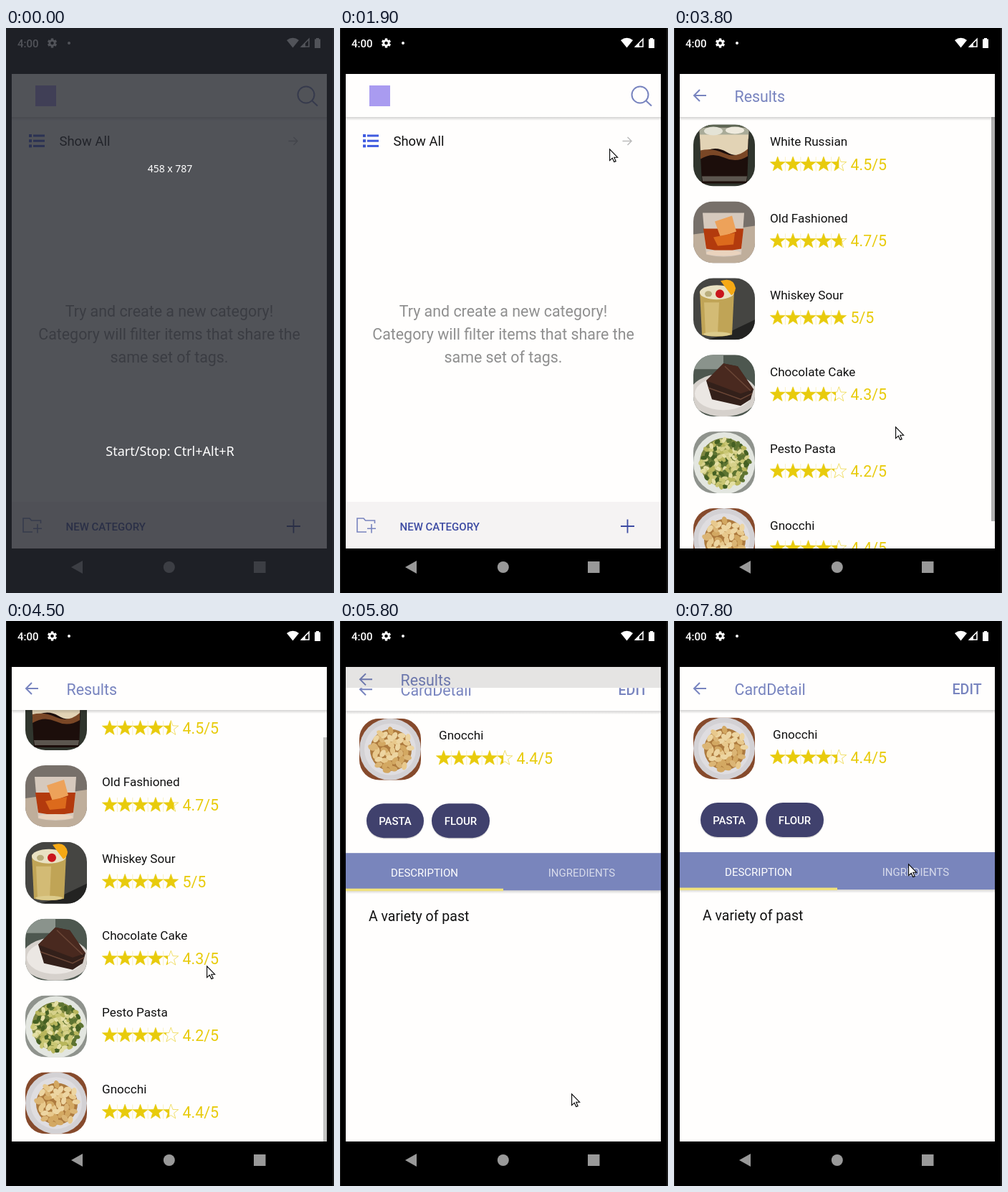
An HTML page that plays this animation: 458 px wide and 787 px high, repeating every 8000 ms.

```html
<!DOCTYPE html>
<html lang="en">
<head>
<meta charset="utf-8">
<style>
html, body { margin: 0; height: 100%; overflow: hidden; background: #000; }
svg { display: block; }
#stage { width: 458px; height: 787px; }
text { font-family: Roboto, sans-serif; white-space: pre; }
.line { fill: none; }
</style>
</head>
<body>
<script>
const LOOP = 8000, W = 440, H = 661;
const LILAC = '#7884bf', PAPER = '#fffefd', GOLD = '#e8cb0c';

const text = (x, y, size, str, fill = '#111', extra = '') =>
  `<text x="${x}" y="${y}" font-size="${size}" fill="${fill}" ${extra}>${str}</text>`;
const rect = (x, y, w, h, fill, extra = '') =>
  `<rect x="${x}" y="${y}" width="${w}" height="${h}" fill="${fill}" ${extra}/>`;
const disc = (x, y, rx, fill, ry = rx) =>
  `<ellipse cx="${x}" cy="${y}" rx="${rx}" ry="${ry}" fill="${fill}"/>`;
const line = (d, color, width = 2) =>
  `<path class="line" d="${d}" stroke="${color}" stroke-width="${width}"/>`;
const shape = (d, fill) => `<path d="${d}" fill="${fill}"/>`;
const view = (id, body) =>
  `<svg id="${id}" x="8" y="64" width="${W}" height="${H}" viewBox="8 64 ${W} ${H}">${body}</svg>`;
const MIDDLE = 'text-anchor="middle"', MEDIUM = 'font-weight="500"';

let seed = 7;
const random = () => (seed = seed * 16807 % 2147483647) / 2147483647;

// Little blobs heaped on a round area
const pile = (n, radius, size, colors) => Array.from({ length: n }, (_, i) => {
  const r = radius * Math.sqrt((i + .5) / n), a = i * 2.39996;
  const x = 43 + r * Math.cos(a) + 3 * random(), y = 43 + r * Math.sin(a) + 3 * random();
  const color = colors[Math.floor(random() * colors.length)];
  return `<g transform="translate(${x.toFixed(1)} ${y.toFixed(1)}) rotate(${Math.round(random() * 180)})">` +
    disc(0, 0, size, color, size * .65) + '</g>';
}).join('');

const photos = [
  rect(0, 0, 86, 86, '#30352d') + rect(0, 0, 86, 5, '#5c6552') +
    shape('M8 4H78L75 82H12Z', '#1c0e0b') + shape('M8 4H78L77 20H9Z', '#a9ab98') +
    shape('M9 14H77L76 36Q62 48 46 38T10 40Z', '#e2d3b5') +
    shape('M10 36Q26 32 43 40T76 34V44Q60 54 43 46T10 48Z', '#7a4726') +
    disc(28, 9, 13, '#e4e3d6', 6) + disc(58, 8, 13, '#eeeadd', 5) + shape('M12 72H75L74 79H13Z', '#5c564f'),
  rect(0, 0, 86, 86, '#77706a') + shape('M0 46L86 34V86H0Z', '#bfae9b') +
    shape('M13 16H71L67 74Q42 80 18 74Z', '#d6c9bd') + shape('M14 38H70L67 66Q42 71 18 66Z', '#b33a0d') +
    shape('M30 28L54 20 60 42 38 50Z', '#eda25a') + shape('M28 50L58 44 56 60 34 62Z', '#dc6a1c') +
    disc(42, 72, 24, '#ead3bd', 4),
  rect(0, 0, 86, 86, '#454542') + shape('M40 80L86 58V86H20Z', '#232322') +
    shape('M9 18H57L54 79Q32 84 12 79Z', '#c0a456') + shape('M15 34H36L34 78H17Z', '#d3bb75') +
    disc(33, 20, 24, '#e9e1c2', 10) +
    shape('M38 4Q56 -2 59 14Q58 22 53 24Z', '#f6a914') + disc(37, 22, 6, '#c9161c') + disc(21, 22, 5, '#b9ad7c', 4) +
    disc(33, 78, 19, '#dccb8c', 3),
  rect(0, 0, 86, 86, '#4d574f') + rect(0, 0, 42, 20, '#8a938c') + disc(42, 56, 48, '#d6d1cc', 30) +
    disc(42, 54, 40, '#ebe7e3', 23) + shape('M18 36L42 12 62 16 84 48 80 62 66 71 26 62Z', '#33201a') +
    shape('M18 36L42 12 62 16 84 48 66 54Z', '#49291f') +
    line('M21 46L66 62 82 54M44 16L80 50', '#6b4636', 1.5),
  rect(0, 0, 86, 86, '#8f938d') + disc(43, 44, 43, '#e3e6e0') + disc(43, 43, 34, '#7d8640') +
    pile(130, 34, 4.2, ['#d6d18a', '#5d7431', '#b8b65c', '#e4dfa4', '#456023', '#c9c673']),
  rect(0, 0, 86, 86, '#864a2c') + disc(43, 43, 43, '#d3d1d4') + disc(43, 43, 36, '#dfdde0') +
    disc(44, 44, 29, '#ad7a3e') + pile(42, 29, 5.6, ['#dbb575', '#e8c98d', '#d3a862', '#edd5a1'])
];

const star = Array.from({ length: 10 }, (_, i) => {
  const r = i % 2 ? 4.5 : 10.9, a = (i - 2.5) * Math.PI / 5;
  return `${(r * Math.cos(a)).toFixed(2)},${(r * Math.sin(a)).toFixed(2)}`;
}).join(' ');
const stars = extra => [0, 1, 2, 3, 4].map(i =>
  `<polygon points="${star}" transform="translate(${10.7 + i * 21.4} 11.5)" ${extra}/>`).join('');
const rating = r =>
  `<g transform="translate(134 178.5)">${stars(`fill="none" stroke="${GOLD}" stroke-width=".6"`)}
  <svg width="${21.4 * r}" height="24">${stars(`fill="${GOLD}"`)}</svg>
  <path d="M21.4 1v20m21.4-20v20m21.4-20v20m21.4-20v20" stroke="${GOLD}" stroke-width=".8" opacity=".3"/></g>` +
  text(246.5, 197.5, 21.4, r + '/5', GOLD);

const foods = [['White Russian', 4.5], ['Old Fashioned', 4.7], ['Whiskey Sour', 5],
  ['Chocolate Cake', 4.3], ['Pesto Pasta', 4.2], ['Gnocchi', 4.4]];
const food = (i, x) =>
  `<g class="photo" transform="translate(27 134.5)"><g clip-path="url(#round)">${photos[i]}</g></g>` +
  text(x, 164, 17.1, foods[i][0]) + rating(foods[i][1]);

const header = body => rect(8, 64, W, 60, PAPER) + rect(8, 124, W, 5, 'url(#shade)') + body;
const backHeader = title => header(
  line('M45 94H28M36 86L28 94 36 102', LILAC) + text(84.5, 102.5, 21.4, title, LILAC));

const home = rect(8, 64, W, H, PAPER) + header(
    rect(41, 80, 29, 29, '#a99bf0') +
    `<circle cx="419" cy="93" r="11.5" fill="none" stroke="${LILAC}" stroke-width="2"/>` +
    line('M427 101L435 108.5', LILAC)) +
  [148, 155.2, 162.4].map(y => rect(32, y, 4, 4, '#3f5be0') + rect(38, y + .5, 16, 3, '#3f5be0')).join('') +
  text(74.5, 164, 18.4, 'Show All') + line('M394.5 157.5H407M401.5 152L407 157.5 401.5 163', '#bcbcbc', 1.5) +
  ['Try and create a new category!', 'Category will filter items that share the', 'same set of tags.']
    .map((s, i) => text(228, 401.5 + i * 32, 21.4, s, '#8f8f8f', MIDDLE)).join('') +
  rect(8, 660, W, 66, '#f5f3f3') +
  line('M37 702H24V683H33L35.5 686H48.5V690M44 691V703.5M38 697.2H50', LILAC, 1.6) +
  text(83.5, 699.5, 15, 'NEW CATEGORY', '#3d4ba3', MEDIUM) +
  line('M392 694H411M401.5 684.5V703.5', '#3d4ba3', 1.8);

const results = rect(8, 64, W, H, PAPER) +
  text(229, 368.5, 21.4, 'No food found!', '#8f8f8f', MIDDLE + ' id="empty"') +
  `<g id="list">${foods.map((_, i) => `<g transform="translate(0 ${i * 106.9})">${food(i, 134)}</g>`).join('')}</g>` +
  rect(443, 124, 5, 563, '#b0b0b0', 'id="bar"') + backHeader('Results') +
  rect(8, 64, W, 680, '#000', 'id="dim" opacity="0"');

const chip = (x, w, str) => rect(x, 254.5, w, 48, '#000', 'rx="24" opacity=".13"') +
  rect(x, 253, w, 48, '#40416d', 'rx="24"') + text(x + w / 2, 283, 15, str, '#fff', `${MIDDLE} ${MEDIUM}`);

const detail = rect(8, 64, W, 700, PAPER) +
  backHeader('CardDetail') + text(388.5, 102, 19.6, 'EDIT', LILAC, MEDIUM) + food(5, 138) +
  chip(37, 80, 'PASTA') + chip(128, 81, 'FLOUR') +
  rect(8, 322, W, 52, '#7985bc') + `<g transform="translate(0 250)">${rect(8, 124, W, 5, 'url(#shade)')}</g>` +
  rect(8, 371.5, 220, 3.5, '#f1e27c') +
  text(118, 354.5, 15, 'DESCRIPTION', '#fff', MIDDLE) +
  text(337.5, 354.5, 15, 'INGREDIENTS', '#fff', MIDDLE + ' opacity=".7"') +
  text(40, 417, 19.5, 'A variety of past');

const gear = Array.from({ length: 6 }, (_, i) =>
  rect(-1.7, -6.6, 3.4, 4, '#fff', `transform="rotate(${i * 60})"`)).join('');
const phone = rect(0, 0, 458, 787, '#000') + rect(0, 0, 1, 787, '#1c1c1c') + rect(456, 0, 2, 787, '#1c1c1c') +
  text(16, 26.5, 15, '4:00', '#fff', MEDIUM) +
  `<g transform="translate(64.5 21)">${gear}<circle r="3.6" fill="none" stroke="#fff" stroke-width="2.6"/></g>` +
  disc(88, 21, 2, '#fff') + shape('M392 17Q400.5 10.5 409 17L400.5 27.5Z', '#fff') +
  line('M412.5 26L423 15.5V26Z', '#fff', 1.6) + shape('M412 27L418 21V27Z', '#fff') +
  shape('M433 14H437V15.5H439V28H431V15.5H433Z', '#fff') +
  shape('M91 751L107 742V760Z', '#999') + disc(227.8, 751, 8, '#999') + rect(346, 743, 16.5, 16, '#999');

const overlay = rect(0, 0, 458, 787, '#262830', 'opacity=".8"') +
  [[201, 14, '458 x 787'], [596, 18, 'Start/Stop: Ctrl+Alt+R']].map(([y, size, s]) =>
    text(229, y, size, s, '#fff', MIDDLE + ' style="font-family:Ubuntu,\'Noto Sans\',sans-serif"')).join('');

document.body.innerHTML = `<svg id="stage" viewBox="0 0 458 787">
<defs>
  <clipPath id="round"><rect width="86" height="86" rx="28"/></clipPath>
  <linearGradient id="shade" x2="0" y2="1">
    <stop stop-opacity=".17"/><stop offset="1" stop-opacity="0"/>
  </linearGradient>
</defs>
${phone}
${view('screen', `<g id="home">${home}</g><g id="results">${results}</g>` +
  view('card', `<g id="detail">${detail}</g>`))}
<path id="cursor" d="M.6.8V16.6L4.3 13.2 6.8 18.6 9.2 17.6 6.8 12.2H11.6Z" fill="#fff" stroke="#000" stroke-width="1.1"/>
<g id="overlay">${overlay}</g></svg>`;

const el = id => document.getElementById(id);
const clamp = v => Math.min(1, Math.max(0, v));
const show = (node, on) => node.style.display = on ? '' : 'none';
const move = (id, x, y) => el(id).setAttribute('transform', `translate(${x} ${y})`);

// Critically damped spring, stiffness 1000, mass 3
const spring = ms => {
  const k = Math.sqrt(1000 / 3) * Math.max(0, ms) / 1000;
  return 1 - Math.exp(-k) * (1 + k);
};

// cubic-bezier(.35, .45, 0, 1)
const reveal = x => {
  let lo = 0, hi = 1, s = .5;
  for (let i = 0; i < 25; i++) {
    s = (lo + hi) / 2;
    if (1.05 * (1 - s) ** 2 * s + s ** 3 < x) lo = s; else hi = s;
  }
  return 1.35 * (1 - s) ** 2 * s + 3 * (1 - s) * s * s + s ** 3;
};

// time, x, y
const path = [
  [1900, 376, 168], [2000, 371, 165], [2100, 367, 162], [3100, 367, 162],
  [3300, 338, 460], [3400, 322, 570], [3600, 320, 570], [3800, 309, 555],
  [4400, 277, 460], [4500, 280, 480], [4800, 321, 632], [4900, 321, 632],
  [5000, 324, 655], [5300, 324, 655], [5400, 323, 658], [6100, 323, 658],
  [6200, 380, 560], [6300, 434, 400], [6400, 370, 270], [6500, 304, 218],
  [6600, 304, 218], [6800, 296, 220], [7100, 296, 220], [7300, 285, 245],
  [7400, 308, 300], [7500, 328, 335], [7600, 328, 335], [7700, 336, 326],
  [7800, 327, 338], [LOOP, 327, 338]
];
const pointer = t => {
  const i = Math.max(1, path.findIndex(p => p[0] > t));
  const [t0, x0, y0] = path[i - 1], [t1, x1, y1] = path[i];
  const k = clamp((t - t0) / (t1 - t0));
  return [Math.round(x0 + (x1 - x0) * k), Math.round(y0 + (y1 - y0) * k)];
};

function draw(now) {
  const t = Math.floor(now % LOOP / 100) * 100; // ten pictures a second
  show(el('overlay'), t < 100);

  const slide = t >= 3200 ? 1 : spring(t - 2386);
  const rise = t > 5600 ? reveal(clamp((t - 5546) / 425)) : 0;
  move('home', -136 * slide, 0);
  move('results', W * (1 - slide), -.02 * H * rise);
  el('dim').setAttribute('opacity', .1 * clamp(rise / .36));

  const loaded = t >= 3200;
  show(el('empty'), !loaded);
  show(el('list'), loaded);
  el('list').querySelectorAll('.photo').forEach(p => show(p, t >= 3300));
  const scroll = 40.5 * clamp((t - 3800) / 400);
  move('list', 0, -scroll);
  move('bar', 0, scroll * .94);
  el('bar').setAttribute('opacity', t < 3600 ? 0 : t >= 5600 ? 1 : clamp((4800 - t) / 400));

  const gap = H * (1 - rise);
  show(el('card'), rise > 0);
  el('card').setAttribute('y', 64 + gap);
  move('detail', 0, -.959 * gap);

  show(el('cursor'), t >= 1900);
  move('cursor', ...pointer(t));
}

const start = performance.now();
function tick() {
  draw(performance.now() - start);
  requestAnimationFrame(tick);
}
tick();
</script>
</body>
</html>
```
